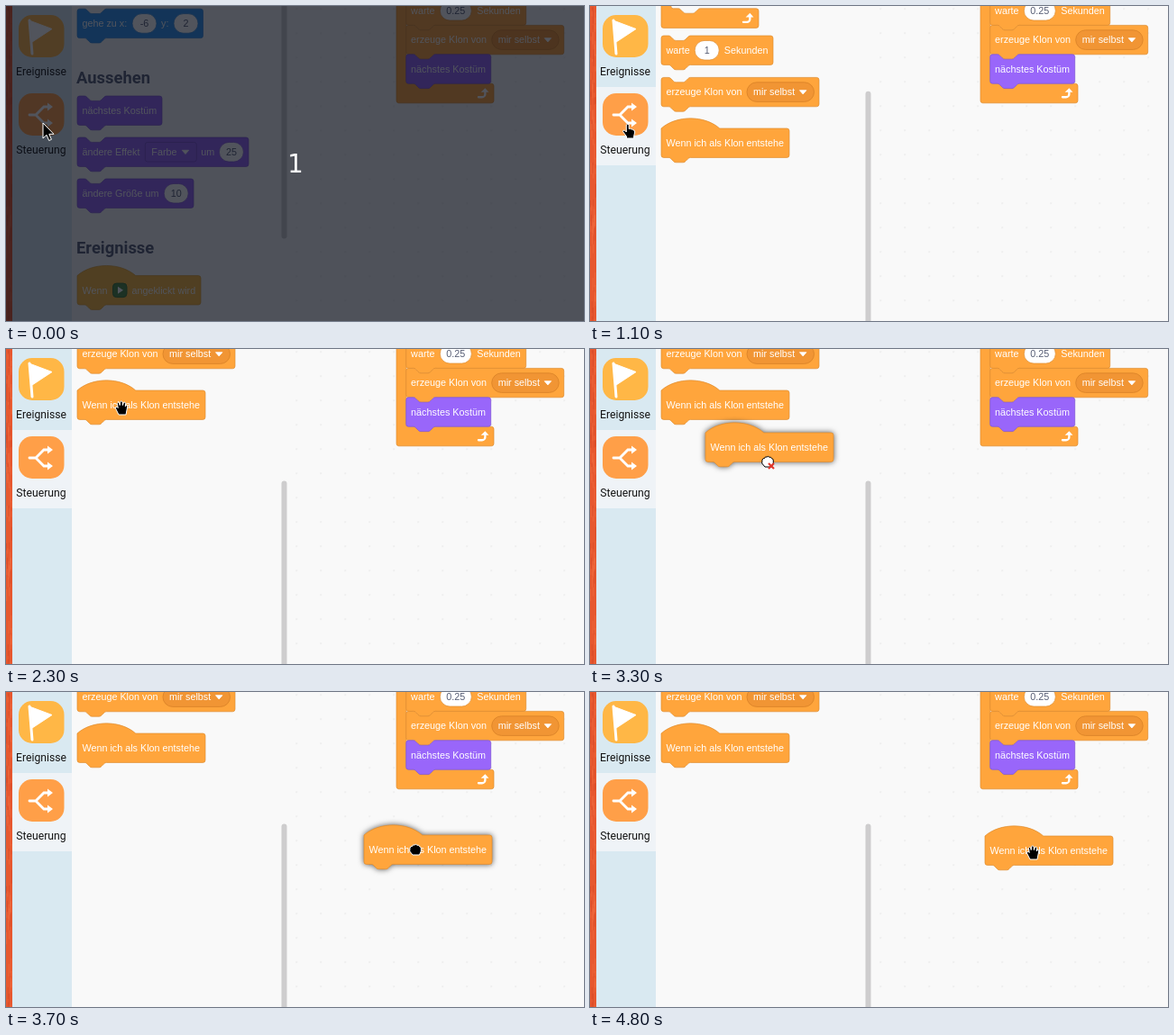
Write an HTML page that moves like this. It is 641 px wide and 350 px high and loops after 6.3 s.

```html
<!DOCTYPE html>
<html lang="de">
<head>
<meta charset="utf-8">
<title>Block ziehen</title>
<style>
  html, body { margin: 0; width: 100%; height: 100%; overflow: hidden; background: #f9f9f9; }
  svg { display: block; }
  .label { font: 10.8px "Liberation Sans", Arial, sans-serif; fill: #fff; }
  .value { fill: #575e75; text-anchor: middle; }
  .heading { font: bold 18.4px Roboto, sans-serif; fill: #575e75; }
  .category { font: 12.2px Roboto, sans-serif; fill: #151515; text-anchor: middle; }
  .count { font: 27.5px "DejaVu Sans", sans-serif; fill: #fff; text-anchor: middle; }
  .lifted { filter: drop-shadow(0 0 3px rgba(0, 0, 0, .65)); }
</style>
</head>
<body>
<svg id="stage" width="641" height="350" viewBox="0 0 641 350"></svg>
<script>
const LOOP = 6300, STEP = 100, SCALE = 0.675;
const BLUE = ['#3095f3', '#2a80d2'], PURPLE = ['#9966fa', '#7d52d4'];
const ORANGE = ['#ffa53c', '#dd8a2c'], YELLOW = ['#fcb93b', '#dc9c2d'];

// Block outlines use unscaled block units.
const NOTCH = 'c2 0 3 1 4 2l4 4c1 1 2 2 4 2h12c2 0 3 -1 4 -2l4 -4c1 -1 2 -2 4 -2';
const NOTCH_BACK = 'c-2 0 -3 1 -4 2l-4 4c-1 1 -2 2 -4 2h-12c-2 0 -3 -1 -4 -2l-4 -4c-1 -1 -2 -2 -4 -2';

const shape = (d, [fill, stroke]) =>
  `<path d="${d}" fill="${fill}" stroke="${stroke}" transform="scale(${SCALE})"/>`;
const at = (x, y, body) => `<g transform="translate(${x} ${y})">${body}</g>`;
const label = (x, text) => `<text class="label" x="${x}" y="20">${text}</text>`;
const heading = (y, text) => `<text class="heading" x="78" y="${y}">${text}</text>`;

function pill(x, text, color, w = 27) {
  return `<rect x="${x}" y="5.4" width="${w}" height="21.6" rx="10.8" fill="#fff" stroke="${color[1]}" stroke-width=".7"/>
    <text class="label value" x="${x + w / 2}" y="20">${text}</text>`;
}

function menu(x, w, text, fill, stroke, radius) {
  return `<rect x="${x}" y="5.4" width="${w}" height="21.6" rx="${radius}" fill="${fill}" stroke="${stroke}" stroke-width=".8"/>
    ${label(x + 7, text)}
    <path d="M${x + w - 16} 14.3h7.4l-3.7 4.2z" fill="#fff" stroke="#fff" stroke-width=".8" stroke-linejoin="round"/>`;
}

function block(x, y, width, color, body, hat = false) {
  const w = width / SCALE;
  const top = hat ? 'M0 0c25 -22 71 -22 96 0' : `M0 4a4 4 0 0 1 4 -4H12${NOTCH}`;
  const d = `${top}H${w - 4}a4 4 0 0 1 4 4V44a4 4 0 0 1 -4 4H48${NOTCH_BACK}H4a4 4 0 0 1 -4 -4z`;
  return at(x, y, shape(d, color) + body);
}

function loopFoot(x, y) {
  const d = `M0 -150H16V-4a4 4 0 0 0 4 4H28${NOTCH}H156a4 4 0 0 1 4 4V28a4 4 0 0 1 -4 4H4a4 4 0 0 1 -4 -4z`;
  const arrow = `<g transform="translate(95 11) scale(${SCALE})">
    <path d="M-6 6H0a5 5 0 0 0 5 -5V-2" fill="none" stroke="#fff" stroke-width="3.4" stroke-linecap="round"/>
    <path d="M-2 -2L5 -9L11 -2z" fill="#fff"/></g>`;
  return at(x, y, shape(d, ORANGE) + arrow);
}

const nextCostume = (x, y) => block(x, y, 94, PURPLE, label(5.4, 'nächstes Kostüm'));
const makeClone = (x, y) => block(x, y, 175, ORANGE,
  label(5.4, 'erzeuge Klon von') + menu(95, 74.5, 'mir selbst', '#f19534', '#d98228', 10.8));
const cloneHat = (x, y) => block(x, y, 142, ORANGE, label(5.4, 'Wenn ich als Klon entstehe'), true);

function eventPalette() {
  const play = `<rect x="39.5" y="8.5" width="15.5" height="15.5" rx="4" fill="#4d8b43" stroke="#3c7436"/>
    <path d="M45 12.2l6 4l-6 4z" fill="#fff"/>`;
  return block(79, 3.2, 139.5, BLUE, label(5.4, 'gehe zu x:') + pill(61, '-6', BLUE) +
      label(93, 'y:') + pill(107, '2', BLUE)) +
    heading(85.7, 'Aussehen') +
    nextCostume(79, 100) +
    block(79, 146, 190, PURPLE, label(5.4, 'ändere Effekt') +
      menu(75.3, 57, 'Farbe', '#9966fa', '#774dcb', 2.7) + label(137.3, 'um') + pill(157.4, '25', PURPLE)) +
    block(79, 192, 129, PURPLE, label(5.4, 'ändere Größe um') + pill(96.2, '10', PURPLE)) +
    heading(275, 'Ereignisse') +
    block(79, 299.6, 137, YELLOW, label(5.4, 'Wenn') + play + label(60.4, 'angeklickt wird'), true);
}

function controlPalette() {
  return loopFoot(79, -87.2) +
    block(79, -57, 124, ORANGE, label(5.4, 'warte') + pill(37.2, '1', ORANGE) + label(69.8, 'Sekunden')) +
    makeClone(79, -10.6) + cloneHat(79, 46);
}

function workspace() {
  return `<rect x="312" width="329" height="350" fill="url(#dots)"/>` +
    loopFoot(433, 86.2) +
    block(443.7, -11, 133, ORANGE,
      label(5.4, 'warte') + pill(37.6, '0.25', ORANGE, 35) + label(78.5, 'Sekunden')) +
    makeClone(443.7, 21.4) + nextCostume(443.7, 53.8);
}

function woodStrip() {
  let seed = 7, grain = '';
  const random = () => (seed = seed * 16807 % 2147483647) / 2147483647;
  for (let i = 0; i < 70; i++) {
    const tone = random() < .5 ? '#cf4424' : '#f47446';
    grain += `<rect x="${random() * 6}" y="${random() * 350}" width="1" height="${4 + random() * 16}" fill="${tone}" opacity=".45"/>`;
  }
  return `<rect width="7" height="350" fill="#e7582f"/>${grain}`;
}

function sidebar() {
  const tile = (y, fill) => `<rect x="14" y="${y}" width="50.5" height="47" rx="15" fill="${fill}"/>`;
  return `<rect x="7" width="66" height="350" fill="#d9e9f1"/>
    <rect id="selected" x="7" y="90" width="66" height="87" fill="#eff3f7"/>
    ${tile(10, '#ffb746')}
    <path d="M26 16L29 53" stroke="#fff" stroke-width="3" stroke-linecap="round"/>
    <path d="M27 16.5L51 25.5L29 40z" fill="#fff" stroke="#fff" stroke-linejoin="round"/>
    <text class="category" x="39" y="77">Ereignisse</text>
    ${tile(97, '#ff9f48')}
    <g fill="none" stroke="#fff" stroke-width="2.8" stroke-linecap="round">
      <path d="M26 121H33L42 112H47M33 121L42 130H47"/></g>
    <path d="M46 107.5l6 4.5l-6 4.5zM46 125.5l6 4.5l-6 4.5z" fill="#fff"/>
    <text class="category" x="39" y="164">Steuerung</text>`;
}

const FIST = 'M-6 -2Q-5 -4 -3.5 -3.5Q-3 -5.8 -1 -5Q1 -6.5 2 -4.7Q4 -5.5 4.5 -3.3Q6.4 -3.3 6.3 -1V2L4.5 6H-3L-6.3 2z';
const OPEN = 'M-3 8L-6.5 1Q-6.8 -1 -5 -.8L-3.8 .5L-4.6 -4.5Q-3.6 -6.5 -2.3 -4.8L-1.8 -2.5L-1.5 -6.3Q0 -8 1.2 -6.3L1.4 -2.5L2.5 -5.7Q4.2 -6.6 4.6 -4.7L4.3 -1L5.3 -2.7Q7 -3 6.7 -1L5 8z';
const POINT = 'M-1.5 7L-5.5 1.5Q-5.5 -.5 -3.5 .2L-1.7 2L-1.7 -6Q0 -7.8 1.2 -6V-1.5Q3 -2.4 3.8 -1Q5.4 -1.7 6 -.1Q7.8 -.2 7.7 2L6.6 7V9H-1.5z';
const ARROW = 'M0 0V17L4 13.3L6.7 19.5L9.4 18.3L6.8 12.3H12z';
const cursorPath = (d, fill = '#000', edge = '#fff') =>
  `<path d="${d}" fill="${fill}" stroke="${edge}" stroke-linejoin="round"/>`;
const CURSORS = {
  arrow: cursorPath(ARROW),
  point: cursorPath(POINT),
  open: cursorPath(OPEN),
  fist: cursorPath(FIST),
  remove: cursorPath(FIST, '#fff', '#000') +
    '<path d="M1 2l6 6M7 2l-6 6" stroke="#e2372b" stroke-width="2.2"/>',
};

// Time, cursor x, y and kind; then the offset of the dragged block.
const POSES = [
  [0, 41, 130, 'arrow'],
  [100, 42, 138, 'point'],
  [2000, 50, 132, 'point'],
  [2100, 85, 98, 'arrow'],
  [2200, 117, 74, 'open'],
  [2300, 128, 65, 'open'],
  [3000, 128, 65, 'fist'],
  [3200, 134, 70, 'fist'],
  [3300, 197, 125, 'remove', 49, 47],
  [3400, 266, 148, 'remove', 118, 84],
  [3500, 338, 169, 'fist', 196, 109],
  [3600, 405, 180, 'fist', 267, 119],
  [3700, 454, 175, 'fist', 318, 113],
  [3800, 469, 176, 'fist', 333, 113],
  [3900, 479, 177, 'fist', 345, 113],
  [4000, 487, 178, 'fist', 354, 114],
  [4100, 491, 178, 'fist', 359, 114],
  [4800, 491, 178, 'open', 359, 114],
];

const stage = document.getElementById('stage');
stage.innerHTML = `
  <defs><pattern id="dots" x="321.5" y="2.5" width="27" height="27" patternUnits="userSpaceOnUse">
    <rect width="1.3" height="1.3" fill="#e2e2e2"/></pattern></defs>
  <rect width="641" height="350" fill="#f9f9f9"/>
  ${workspace()}
  <g id="events">${eventPalette()}</g>
  <g id="controls">${controlPalette()}</g>
  <rect id="scrollbar" x="305.5" width="6" height="400" rx="3" fill="#cecdce"/>
  ${woodStrip()}${sidebar()}
  <g id="dragged">${cloneHat(79, 46)}</g>
  <g id="countdown"><rect width="641" height="350" fill="#080c18" fill-opacity=".7"/>
    <text class="count" x="321" y="185">1</text></g>
  <g id="cursor"></g>`;

const parts = Object.fromEntries([...stage.querySelectorAll('[id]')].map(el => [el.id, el]));
const show = (el, on) => el.setAttribute('display', on ? 'inline' : 'none');
const move = (el, x, y) => el.setAttribute('transform', `translate(${x} ${y})`);
let cursorKind;

function render(time) {
  const t = Math.floor(time / STEP) * STEP;
  const switched = t >= 1100;
  const scroll = t >= 1400 ? 0 : 90 * 0.7 ** ((t - 1100) / STEP * 6);
  const [, x, y, kind, dx, dy] = POSES.findLast(pose => pose[0] <= t);

  show(parts.countdown, t < 100);
  show(parts.events, !switched);
  show(parts.controls, switched);
  show(parts.selected, switched);
  move(parts.controls, 0, switched ? scroll : 0);
  parts.scrollbar.setAttribute('y', switched ? 146.5 - scroll * 0.575 : -141.5);

  show(parts.dragged, dx !== undefined);
  move(parts.dragged, dx || 0, dy || 0);
  parts.dragged.classList.toggle('lifted', t < 4700);

  if (kind !== cursorKind) parts.cursor.innerHTML = CURSORS[cursorKind = kind];
  move(parts.cursor, x, y);
}

const start = performance.now();
function tick() {
  render((performance.now() - start) % LOOP);
  requestAnimationFrame(tick);
}
tick();
</script>
</body>
</html>
```
